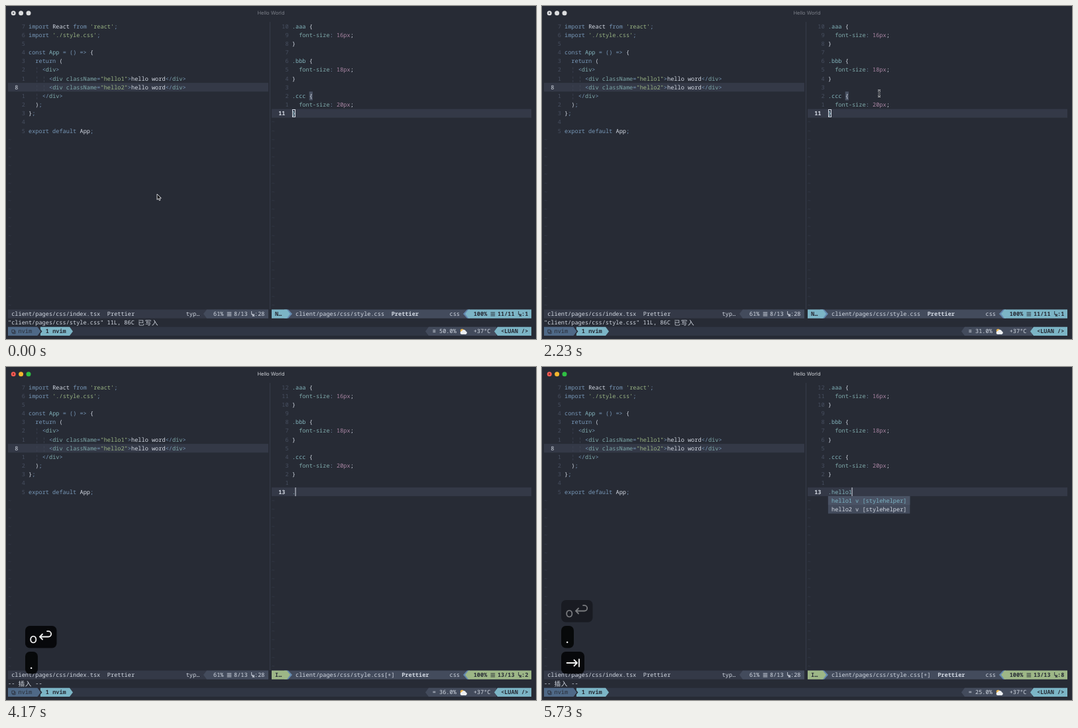
Animation, 800 px wide and 503 px high, one loop 5760 ms. Source, as an HTML page with a canvas:

```html
<!DOCTYPE html>
<html lang="en">
<head>
<meta charset="utf-8">
<title>Hello World</title>
<style>
html, body { margin: 0; width: 100%; height: 100%; overflow: hidden; background: #272b35; }
canvas { display: block; width: 800px; height: 503px; }
</style>
</head>
<body>
<canvas id="stage" width="800" height="503"></canvas>
<script>
const ctx = document.getElementById('stage').getContext('2d');
const LOOP = 5760, CELL = 5.167, ROW = 13.17;
const MONO = '"Noto Sans Mono", "DejaVu Sans Mono", monospace';
const SANS = 'Inter, "Open Sans", sans-serif';
const CJK = '"Noto Sans CJK SC", "Noto Sans CJK", sans-serif';

const BG = '#272b35', LINE = '#343947', SEG = '#434b5c', TEXT = '#d3d9e3';
const CYAN = '#7cb5c6', BLUE = '#6489b0', GREEN = '#9db787', DIM = '#474f60';
const INK = { b: '#7898b8', c: '#83b4bc', g: '#9ab584', w: TEXT, p: '#aa86a4', t: '#80abac' };

// Times of the events, in ms
const FOCUS = 2600, OPEN = 3150, ENTER = 3450, DOT = 4150, POPUP = 4300, TAB = 4680, TAB_KEY = 4720;

const tsx = [
  "bimport |wReact |bfrom |g'react'|b;",
  "bimport |g'./style.css'|b;",
  "",
  "bconst |cApp |b= () => |w{",
  "b  return |w(",
  "b    <|tdiv|b>",
  "b      <|tdiv |tclassName|b=|g\"hello1\"|b>|whello word|b</|tdiv|b>",
  "b      <|tdiv |tclassName|b=|g\"hello2\"|b>|whello word|b</|tdiv|b>",
  "b    </|tdiv|b>",
  "w  )|b;",
  "w}|b;",
  "",
  "bexport default |wApp|b;"
];
const rule = (name, size) => [`c.${name} |w{`, `t  font-size|b: |p${size}px|w;`, 'w}'];
const css = [...rule('aaa', 16), '', ...rule('bbb', 18), '', ...rule('ccc', 20)];

const colX = col => 3 + col * CELL;
const rowY = row => 23.9 + row * ROW;

function rect(x, y, w, h, color) {
  ctx.fillStyle = color;
  ctx.fillRect(x, y, w, h);
}

function text(col, row, str, color, bold) {
  ctx.font = `${bold ? 'bold ' : ''}8.6px ${MONO}`;
  ctx.fillStyle = color;
  ctx.fillText(str, colX(col), rowY(row) + 9.6);
}

function wide(col, row, str) {
  ctx.font = `9.6px ${CJK}`;
  ctx.fillStyle = TEXT;
  [...str].forEach((ch, i) => ctx.fillText(ch, colX(col + 2 * i), rowY(row) + 10.2));
}

function code(col, row, line) {
  for (const part of line.split('|')) {
    text(col, row, part.slice(1), INK[part[0]]);
    col += Math.max(part.length - 1, 0);
  }
}

// Bar segment whose ends are cut by l and r pixels, pointing outwards
function segment(x1, x2, row, color, l = 0, r = 0) {
  const y = rowY(row), m = y + ROW / 2, e = y + ROW;
  ctx.fillStyle = color;
  ctx.beginPath();
  ctx.moveTo(x1, y);
  ctx.lineTo(x2, y);
  ctx.lineTo(x2 + r, m);
  ctx.lineTo(x2, e);
  ctx.lineTo(x1, e);
  ctx.lineTo(x1 - l, m);
  ctx.fill();
}

function disc(x, y, r, color) {
  ctx.fillStyle = color;
  ctx.beginPath();
  ctx.arc(x, y, r, 0, 7);
  ctx.fill();
}

function stroke(path, color, width) {
  ctx.strokeStyle = color;
  ctx.lineWidth = width;
  ctx.stroke(new Path2D(path));
}

function gutter(col, current, total, last) {
  for (let i = 0; i < total; i++) {
    const n = String(Math.abs(current - i));
    if (i !== current) text(col + 5 - n.length, i, n, DIM);
  }
  text(col + 2, current, String(current + 1), TEXT, col > 9);
  for (let i = total; i < 33; i++) text(col, i, '~', '#363d4b');
}

function position(col, percent, lines, column, color, bold) {
  text(col, 33, percent, color, bold);
  const bars = colX(col + percent.length + 1), y = rowY(33);
  for (let i = 0; i < 3; i++) rect(bars, y + 4 + i * 2.4, 6.6, 1, color);
  col += percent.length + 3;
  text(col, 33, lines, color, bold);
  col += lines.length + 1;
  const x = colX(col);
  stroke(`M${x + .8} ${y + 2.5}v5h1.6M${x + 2.5} ${y + 10.5}v-4l2 4v-4`, color, .9);
  text(col + 1, 33, ':' + column, color, bold);
}

function titleBar(focused) {
  const lights = focused ? ['#f45c54', '#f3b62e', '#2fc043'] : ['#dcdddf', '#dcdddf', '#dcdddf'];
  lights.forEach((color, i) => disc(11.2 + i * 11.4, 10.7, 3.5, color));
  disc(11.2, 10.7, 1.1, focused ? '#7d1c18' : '#42464e');
  ctx.font = `7.5px ${SANS}`;
  ctx.textAlign = 'center';
  ctx.fillStyle = focused ? '#cfd2d7' : '#7b7f88';
  ctx.fillText('Hello World', 400, 13.4);
  ctx.textAlign = 'left';
}

function leftPane() {
  rect(3, rowY(7), 393, ROW, LINE);
  rect(398, 24, 1, 434, '#353b49');
  gutter(0, 7, 13);
  for (const [row, count] of [[5, 1], [6, 2], [7, 2], [8, 1]])
    for (let i = 0; i < count; i++) text(8 + 2 * i, row, '¦', '#434a59');
  tsx.forEach((line, i) => code(6, i, line));

  segment(3, 396, 33, LINE);
  segment(303, 396, 33, SEG, 5);
  text(1, 33, 'client/pages/css/index.tsx', TEXT);
  text(29, 33, 'Prettier', TEXT);
  text(52, 33, 'typ…', TEXT);
  position(60, '61%', '8/13', 28, TEXT);
}

function rightPane(t) {
  const insert = t >= OPEN;
  const row = t >= ENTER ? 12 : insert ? 11 : 10;
  const y = rowY(row);
  rect(401, y, 392, ROW, LINE);
  gutter(77, row, row + 1);
  if (!insert) rect(colX(88), rowY(8), CELL, ROW, '#4a5364');
  css.forEach((line, i) => code(83, i, line));

  if (!insert) {
    const x = colX(83);
    if (t >= FOCUS) rect(x, y, CELL, ROW, '#e0e5ec');
    else {
      ctx.strokeStyle = '#d5dbe5';
      ctx.lineWidth = 1;
      ctx.strokeRect(432.5, 156.5, 4, 11);
    }
    text(83, 10, '}', t >= FOCUS ? BG : CYAN);
  } else {
    const typed = t >= TAB ? '.hello1' : t >= DOT ? '.' : '';
    text(83, row, typed, INK.c);
    rect(Math.round(colX(83 + typed.length)) - .5, y, 1, ROW, '#d8dee9');
  }

  if (t >= POPUP) {
    const x = colX(83);
    rect(x, rowY(13), 123.5, ROW * 2, SEG);
    if (t >= TAB) rect(x, rowY(13), 123.5, ROW, '#4a5365');
    text(84, 13, 'hello1 v [stylehelper]', t >= TAB ? CYAN : TEXT);
    text(84, 14, 'hello2 v [stylehelper]', TEXT);
  }

  const mode = insert ? GREEN : CYAN;
  segment(401, 793, 33, SEG);
  segment(420, 426, 33, BLUE, 0, 6);
  segment(401, 424, 33, mode, 0, 5);
  segment(696, 700, 33, BLUE, 6);
  segment(698, 793, 33, mode, 5);
  text(78, 33, insert ? 'I…' : 'N…', BG, true);
  text(84, 33, 'client/pages/css/style.css' + (insert ? '[+]' : ''), TEXT);
  text(insert ? 115 : 112, 33, 'Prettier', TEXT, true);
  text(129, 33, 'css', TEXT);
  const column = t >= TAB_KEY ? 8 : t >= DOT ? 2 : 1;
  position(136, '100%', `${row + 1}/${row + 1}`, column, BG, true);
}

function commandLine(t) {
  if (t >= OPEN) {
    text(0, 34, '--', TEXT);
    wide(3, 34, '插入');
    text(8, 34, '--', TEXT);
  } else {
    text(0, 34, '"client/pages/css/style.css" 11L, 86C', TEXT);
    wide(38, 34, '已写入');
  }
}

function sessionBar(t) {
  const load = t < 700 ? '50.0' : t < 2600 ? '31.0' : t < 4500 ? '36.0' : '25.0';
  segment(3, 793, 35, '#303644');
  segment(52, 96, 35, CYAN, 0, 5);
  segment(3, 49, 35, BG, 0, 5.5);
  segment(3, 47.5, 35, '#4f6987', 0, 5);
  segment(638, 740, 35, SEG, 5);
  segment(742, 793, 35, CYAN, 5);
  stroke('M8.8 489.2h4v4h-4zM10 493.2v1.6h4v-4h-1.2', BG, .8);
  text(3, 35, 'nvim', BG);
  text(11, 35, '1 nvim', BG, true);
  text(124, 35, t < 3300 ? '≡' : '=', TEXT);
  text(126, 35, load + '%', TEXT);
  text(136, 35, '+37°C', TEXT);
  text(144, 35, '<LUAN />', BG, true);
  disc(688.5, 490.5, 2.7, '#e9b64f');
  disc(688.2, 493.4, 2.5, '#eceff2');
  disc(691, 492, 3, '#eceff2');
  disc(693.5, 493.6, 2.3, '#eceff2');
  rect(688, 493, 6, 2.9, '#eceff2');
}

function keyBox(y, width, label, path, alpha = 1) {
  ctx.save();
  ctx.globalAlpha = alpha;
  ctx.translate(29, y);
  ctx.fillStyle = 'rgba(5,6,8,.93)';
  ctx.beginPath();
  ctx.roundRect(0, 0, width, 33.5, 7);
  ctx.fill();
  ctx.font = `20px ${SANS}`;
  ctx.fillStyle = '#f4f4f4';
  ctx.fillText(label, 6.3, 25.5);
  ctx.lineCap = 'round';
  if (path) stroke(path, '#f4f4f4', 1.8);
  ctx.restore();
}

function keys(t) {
  if (t < OPEN) return;
  const shift = (t >= DOT) + (t >= TAB_KEY);
  const fade = Math.min(1, 1 - (t - 5600) / 236);
  const entered = t >= ENTER;
  const arrow = 'M22 16.5H35a4.2 4.2 0 0 0 0-8.4H33M26 12.5l-4 4l4 4';
  keyBox(430 - 39 * shift, entered ? 47.5 : 25, 'o', entered && arrow, fade);
  if (t >= DOT) keyBox(430 - 39 * (shift - 1), 19, '.');
  if (t >= TAB_KEY) keyBox(430, 35, '', 'M8.5 17H24M19.5 12.5l4.5 4.5l-4.5 4.5M27 11.5v11');
}

function pointer(t) {
  if (t >= OPEN) return;
  const ease = (a, b) => {
    const u = Math.min(1, Math.max(0, (t - a) / (b - a)));
    return u * u * (3 - 2 * u);
  };
  const up = ease(700, 1350), across = ease(1500, 2050);
  const x = 228 - 37 * up + 318 * across, y = 284 - 159 * up + 7 * across;
  ctx.save();
  ctx.translate(x, y);
  if (x > 400) {
    const beam = 'M-2 -4.5q2 0 2 1.5v6q0 1.5 -2 1.5M2 -4.5q-2 0 -2 1.5v6q0 1.5 2 1.5';
    stroke(beam, '#e4e6ea', 2.4);
    stroke(beam, '#15171b', .9);
  } else {
    const arrow = new Path2D('M0 0v8.6l2-1.8l1.4 3l1.5-.7l-1.3-2.9h2.7z');
    ctx.fillStyle = '#101114';
    ctx.fill(arrow);
    ctx.strokeStyle = '#e8e9ec';
    ctx.lineWidth = .9;
    ctx.stroke(arrow);
  }
  ctx.restore();
}

function draw(t) {
  rect(0, 0, 800, 503, BG);
  titleBar(t >= FOCUS);
  leftPane();
  rightPane(t);
  commandLine(t);
  sessionBar(t);
  keys(t);
  pointer(t);
}

const start = performance.now();
function tick() {
  draw((performance.now() - start) % LOOP);
  requestAnimationFrame(tick);
}
ctx.textRendering = 'geometricPrecision';
tick();
</script>
</body>
</html>
```
